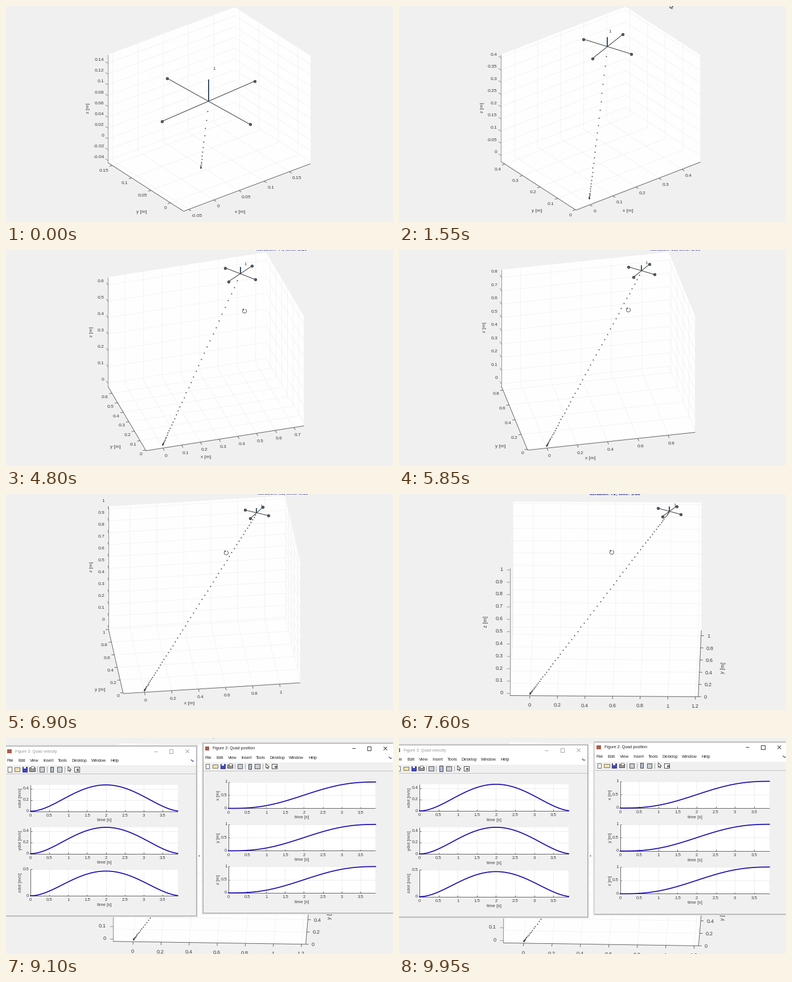
Write a matplotlib script that moves like this. It is 680 by 382 pixels and loops after 10000 ms.

```python
import numpy as np
import matplotlib.pyplot as plt
from matplotlib.animation import FuncAnimation
from matplotlib.collections import LineCollection
from matplotlib.patches import Polygon, Rectangle

W, H, STEP, FRAMES = 680, 382, 50, 200
POPUP = 8100                      # ms when the result windows open
INK, GREY, BLUE = "#404040", "#f0f0f0", "#1c10b4"

plt.rcParams["font.family"] = "Liberation Sans"
fig = plt.figure(figsize=(W / 100, H / 100), dpi=100, facecolor=GREY)
ax = fig.add_axes([0, 0, 1, 1])
ax.set_axis_off()
ax.set_xlim(0, W)
ax.set_ylim(H, 0)


def smooth(u):
    return 10 * u**3 - 15 * u**4 + 6 * u**5


def smooth_rate(u):
    return 30 * u**2 * (1 - u)**2


def keyed(t, times, rows):
    return np.array([np.interp(t, times, col) for col in zip(*rows)])


def text(x, y, s, px, color=INK, ha="center", va="center", **kw):
    return ax.text(x, y, s, fontsize=px * 0.72, color=color, ha=ha, va=va, **kw)


def lines(segs, color, lw, z):
    return ax.add_collection(LineCollection(segs, colors=color, linewidths=lw * 0.72, zorder=z))


# ---------- result windows ----------

def box(x, y, w, h, fill, edge="none", lw=0.7, z=10):
    return ax.add_patch(Rectangle((x, y), w, h, facecolor=fill, edgecolor=edge,
                                  linewidth=lw * 0.72, zorder=z))


def chart(x0, top, bottom, ymax, yticks, name, curve):
    w, tmax = 255, 3.9
    out = [box(x0, top, w, bottom - top, "white", z=12)]
    xs = [x0 + v / tmax * w for v in np.arange(0, 4, 0.5)]
    ys = [bottom - v / ymax * (bottom - top) for v in yticks]
    grid = [[(x, top), (x, bottom)] for x in xs] + [[(x0, y), (x0 + w, y)] for y in ys]
    out.append(lines(grid, "#e6e6e6", 0.7, 13))
    frame = [[(x0, top), (x0, bottom)], [(x0, bottom), (x0 + w, bottom)]]
    frame += [[(x, bottom), (x, bottom - 2.5)] for x in xs]
    frame += [[(x0, y), (x0 + 2.5, y)] for y in ys]
    out.append(lines(frame, INK, 0.8, 14))
    t = np.linspace(0, tmax, 120)
    out += ax.plot(x0 + t / tmax * w, bottom - curve(t / 4) / ymax * (bottom - top),
                   color=BLUE, lw=1.3, zorder=15)
    for i, x in enumerate(xs):
        out.append(text(x, bottom + 7.5, f"{i * 0.5:g}", 7.6, zorder=16))
    for v, y in zip(yticks, ys):
        out.append(text(x0 - 2.5, y, f"{v:g}", 7.6, ha="right", zorder=16))
    out.append(text(x0 + w / 2, bottom + 16, "time [s]", 7.8, zorder=16))
    out.append(text(x0 - 17, (top + bottom) / 2, name, 7.8, rotation=90, zorder=16))
    return out


def toolbar(dx, dy):
    y = dy + 57
    out = []
    for x, w, h, fill, edge in [(14, 6, 8, "white", "#555555"), (27, 9, 6, "#efe3b4", "#6b6548"),
                                (40, 8, 8, "#4448b8", "#2c2f80"), (53, 9, 6, "#9a9a9a", "#444444"),
                                (70, 8, 8, "#c8ccd4", "#444444"), (87, 5, 9, "#aebcd8", "#333333"),
                                (100, 8, 8, "#dfe3ee", "#333333"), (130, 9, 8, "white", "#333333")]:
        out.append(box(dx + x - w / 2, y - h / 2, w, h, fill, edge, 0.9, 13))
    out.append(box(dx + 38, y - 4, 4, 3, "white", z=14))
    out.append(box(dx + 51, y - 5, 5, 4, "white", "#555555", z=14))
    out.append(box(dx + 130, y - 1, 4, 4, "#777777", z=14))
    bars = [[(dx + x, y - 5), (dx + x, y + 5)] for x in (61.5, 78.5, 109)]
    bars += [[(dx + 97, y + k), (dx + 103, y + k)] for k in (-1.5, 1.5)]
    out.append(lines(bars, "#888888", 0.7, 14))
    out.append(arrow(dx + 115, y - 5, 14, "white"))
    return out


def arrow(x, y, z, fill="#ffffff"):
    pts = [(0, 0), (0, 8), (1.9, 6.3), (3.1, 9), (4.3, 8.5), (3.2, 5.9), (5.6, 5.7)]
    return ax.add_patch(Polygon([(x + a, y + b) for a, b in pts], facecolor=fill,
                                edgecolor="#333333", linewidth=0.6, zorder=z))


def window(dx, dy, title, ink, charts):
    out = [box(dx + 7 - k, dy + 17 - k, 330 + 2 * k, 295 + 2 * k, c, z=9)
           for k, c in ((3, "#e6e6e6"), (2, "#d6d6d6"), (0.8, "#a2a2a2"))]
    out += [box(dx + 7, dy + 17, 330, 295, GREY, z=10),
            box(dx + 7, dy + 17, 330, 33, "white", z=11),
            box(dx + 10, dy + 22, 7, 7, "#a8604a", z=12)]
    out.append(text(dx + 23, dy + 26, title, 7.1, ink, "left", zorder=12))
    x, y = dx + 267, dy + 25.5
    out.append(lines([[(x - 3, y), (x + 3, y)],
                      [(x + 24, y - 3), (x + 30, y - 3), (x + 30, y + 3), (x + 24, y + 3),
                       (x + 24, y - 3)],
                      [(x + 52, y - 3), (x + 58, y + 3)], [(x + 52, y + 3), (x + 58, y - 3)]],
                     ink, 0.9, 12))
    menu = "File Edit View Insert Tools Desktop Window Help".split()
    for x, word in zip((15, 35, 57, 81, 106, 135, 168, 196), menu):
        out.append(text(dx + x, dy + 42, word, 7.3, "#222222", zorder=12))
    out.append(lines([[(dx + 328, dy + 40), (dx + 331, dy + 43), (dx + 333, dy + 42)]],
                     "#2a2a90", 1.1, 12))
    out.append(lines([[(dx + 7, dy + 64.5), (dx + 337, dy + 64.5)]], "#b4b4b4", 0.8, 12))
    out += toolbar(dx, dy)
    for (top, bottom), spec in zip(((84, 130), (158, 204), (231.5, 277.5)), charts):
        out += chart(dx + 50, dy + top, dy + bottom, *spec)
    return out


def speed(u):
    return smooth_rate(u) / 4


windows = window(0, 0, "Figure 3: Quad velocity", "#9a9a9a",
                 [(0.47, (0, 0.2, 0.4), "xdot [m/s]", speed),
                  (0.47, (0, 0.2, 0.4), "ydot [m/s]", speed),
                  (0.5, (0, 0.5), "zdot [m/s]", speed)])
windows += window(343, -5, "Figure 2: Quad position", "#222222",
                  [(1, (0, 0.5, 1), f"{c} [m]", smooth) for c in "xyz"])
window_text = [(a, a.get_fontsize()) for a in windows if hasattr(a, "get_fontsize")]

# ---------- flight view ----------

VIEW_T = (0, 1550, 2300, 2850, 4800, 6900, 7700)
# front corner, x edge, y edge, height of the plot box
VIEW = [(312, 363, 223, -84, -133, -86, -191),
        (311, 361, 219, -85, -132, -86, -189),
        (311, 361, 219, -85, -132, -86, -189),
        (296, 358, 230, -77, -116, -97, -182),
        (246, 355, 278, -44, -67, -114, -193),
        (206, 353, 311, -19, -26, -114, -217),
        (193, 357, 334, 5, 10, -118, -227)]
# x, y and z axis names, then the title
NAMES = [(411, 365, 238, 365, 144, 181, 400, -14),
         (402, 362, 242, 362, 146, 180, 400, -12),
         (402, 362, 242, 362, 146, 180, 400, -12),
         (390, 361, 231, 356, 148, 171, 425, -9),
         (351, 366, 192, 349, 151, 145, 484, 0.5),
         (322, 370, 165, 346, 151, 129, 486, 0.5),
         (370, 389, 158, 344, 153, 240, 364, 2.5)]
# axis lengths and the distance of zero from the lower limits, by progress
PROGRESS = (0.068, 0.339, 0.384, 0.593, 0.932, 1)
LIMITS = [(0.252, 0.195, 0.2, 0.06, 0.034, 0.044),
          (0.541, 0.426, 0.4375, 0.06, 0.004, 0.025),
          (0.597, 0.47, 0.487, 0.065, 0.004, 0.0235),
          (0.845, 0.68, 0.666, 0.09, 0.006, 0.018),
          (1.31, 1.02, 1.033, 0.157, 0.015, 0.011),
          (1.374, 1.1, 1.033, 0.144, 0, 0.018)]
ITER_T = (0, 1550, 1750, 2850, 4800, 6900, 8050)
ITER = (17, 33, 35, 35, 44, 63, 78)
live = []


def ticks(low, size, step):
    first = int(np.ceil(low / step - 1e-6))
    last = int(np.floor((low + size) / step + 1e-6))
    return [round(k * step, 4) for k in range(first, last + 1)]


def pick(size, *rules):
    return next(step for limit, step in rules if size < limit)


def unit(v):
    return v / np.hypot(*v)


def draw_view(t):
    n = int(np.interp(t, ITER_T, ITER) + 1e-6)
    p = smooth(n * 0.05 / 4)
    v = keyed(t, VIEW_T, VIEW)
    corner, ex, ey, ez = v[:2], v[2:4], v[4:6], np.array([0, v[6]])
    lim = keyed(p, PROGRESS, LIMITS)
    size, low = lim[:3], -lim[3:]
    sx, sy, sz = ex / size[0], ey / size[1], ez / size[2]
    origin = corner + np.array([sx, sy, sz]).T @ -low
    flipped = ey[0] > 0
    px = np.interp(t, (6900, 7700), (8.4, 9.4))

    hull = [corner, corner + ez, corner + ey + ez, corner + ex + ey + ez,
            corner + ex + ey, corner + ex]
    if not flipped:
        hull = [corner, corner + ey, corner + ey + ez, corner + ex + ey + ez,
                corner + ex + ez, corner + ex]
    live.append(ax.add_patch(Polygon(hull, facecolor="#fefefe", edgecolor="none", zorder=1)))

    tx = ticks(low[0], size[0], pick(size[0], (0.3, 0.05), (0.9, 0.1), (9, 0.2)))
    ty = ticks(low[1], size[1], pick(size[1], (0.3, 0.05), (0.75, 0.1), (9, 0.2)))
    tz = ticks(low[2], size[2], pick(size[2], (0.25, 0.02), (0.5, 0.05), (9, 0.1)))
    side = corner if flipped else corner + ex       # foot of the side wall
    z_foot = corner if flipped else corner + ey
    y_foot = corner + ex if flipped else corner
    hx, hy = unit(ex), unit(ey)
    z_dir = -hx if flipped else hy
    y_dir = hx if flipped else -hx
    grid = []
    axes = [[corner, corner + ex], [y_foot, y_foot + ey]]
    marks = [[z_foot, z_foot + ez]]

    for val in tx:
        q = corner + (val - low[0]) * sx
        grid.append([q, q + ey, q + ey + ez])
        axes.append([q, q - hy * 5])
        s = f"{val:g}"
        lean = -hy[0]
        dx = lean * (10 + (len(s) - 1) * px * 0.22)
        live.append(text(q[0] + dx, q[1] + 8 - 7 * hy[1] + 2 * flipped, s, px, zorder=4))
    for val in ty:
        q = y_foot + (val - low[1]) * sy
        w = side + (val - low[1]) * sy
        grid.append([q, q + (ex if not flipped else -ex)])
        grid.append([w, w + ez])
        axes.append([q, q + y_dir * 5])
        if flipped:
            live.append(text(q[0] + 10, q[1] + 1, f"{val:g}", px, ha="left", zorder=4))
        else:
            live.append(text(q[0] - 6.5, q[1] + 5 + 14 * abs(hx[1]), f"{val:g}", px,
                             ha="right", zorder=4))
    steep = max(0, (-hy[1] - 0.8) / 0.175)
    for val in tz:
        up = (val - low[2]) * sz
        q = z_foot + up
        grid.append([side + up, side + ey + up])
        grid.append([corner + ey + up, corner + ex + ey + up])
        marks.append([q, q + z_dir * 5])
        if flipped:
            live.append(text(q[0] - 12, q[1] - 1, f"{val:g}", px, ha="right", zorder=4))
        else:
            live.append(text(q[0] - 6.5, q[1] - 5.5 - 9 * steep**2, f"{val:g}", px,
                             ha="right", zorder=4))
    live.append(lines(grid, "#efefef", 0.7, 2))
    live.append(lines(axes, "#555555", 0.9, 3))
    live.append(lines(marks, "#858585", 0.9, 3))

    x1, y1, x2, y2, x3, y3, x4, y4 = keyed(t, VIEW_T, NAMES)
    live.append(text(x1, y1, "x [m]", px, zorder=4))
    if flipped:
        live.append(text(569, 308, "y [m]", px, rotation=85, zorder=4))
    else:
        live.append(text(x2, y2, "y [m]", px, zorder=4))
    live.append(text(x3, y3, "z [m]", px, rotation=90, zorder=4))
    live.append(text(x4, y4, f"Iteration: {n}, time: {n * 0.05:.2f}", 8.2, "#20208a",
                     va="baseline", weight="bold", zorder=4))

    # trail, then the craft turning as it climbs
    diag = sx + sy + sz
    trail = origin + np.outer(smooth(np.arange(n) * 0.05 / 4), diag)
    live.extend(ax.plot(*trail.T, "s", ms=1.25, color="#383838", mew=0, zorder=5))
    c = origin + p * diag
    yaw = np.radians(60) * p
    a = 0.098 * (np.cos(yaw) * sx + np.sin(yaw) * sy)
    b = 0.098 * (np.sin(yaw) * sx - np.cos(yaw) * sy)
    live.append(lines([[c - a, c + a], [c - b, c + b]], "#454545", 1.1, 6))
    live.append(lines([[c, c + 0.04 * sz]], "#2c4558", 1.9, 6))
    tips = np.array([c - a, c + a, c - b, c + b])
    live.extend(ax.plot(*tips.T, "o", ms=3.2, mfc="#56606a", mec="#33383e", mew=0.6, zorder=7))
    tag = c + 0.04 * sx + 0.038 * sy + 0.028 * sz
    live.append(text(*tag, "1", 8.2, zorder=7))


CURSOR_T = (1400, 1550, 2350, 2850, 4800, 6900, 7700, 8200, 8400, 9000)
CURSOR = [(476, -10), (476, -4), (465, 111), (457, 111), (419, 108), (387, 104),
          (372, 103), (536, 38), (536, 38), (700, 20)]


def draw_cursor(t):
    if not 1400 <= t < 9000:
        return
    x, y = keyed(t, CURSOR_T, CURSOR)
    if 2350 <= t < 7700:
        u = np.radians(np.linspace(-60, 245, 24))
        live.extend(ax.plot(x + 3.6 * np.cos(u), y + 3.6 * np.sin(u), color="#5a5a5a",
                            lw=0.7, zorder=20))
        live.append(lines([[(x - 3.6, y - 3.6), (x - 0.8, y - 3.6), (x - 1.8, y - 1)]],
                          "#5a5a5a", 0.9, 20))
    else:
        live.append(arrow(x, y, 20))


def draw(frame):
    t = frame * STEP
    while live:
        live.pop().remove()
    u = max(0, (t - 8250) / 1700)
    zoom = 1 + 0.028 * u
    left, top = 50 - (50 - 14 * u) / zoom, 130 - (130 - u) / zoom
    ax.set_xlim(left, left + W / zoom)
    ax.set_ylim(top + H / zoom, top)
    for item in windows:
        item.set_visible(t >= POPUP)
    for item, pt in window_text:
        item.set_fontsize(pt * zoom)
    draw_view(t)
    draw_cursor(t)
    return []


anim = FuncAnimation(fig, draw, frames=FRAMES, init_func=lambda: [], interval=STEP,
                     repeat=True, repeat_delay=0, blit=False)
plt.show()
```
